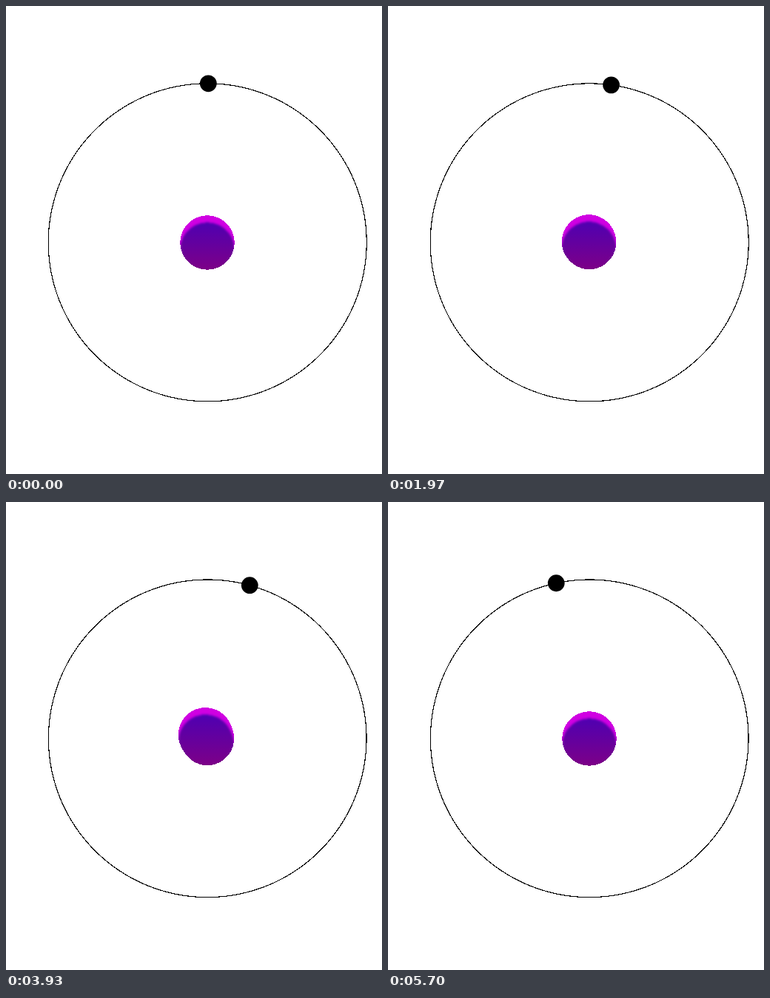
An HTML page with a canvas that plays this animation: 508x633 px, repeating every 5.73 s.

```html
<!DOCTYPE html>
<html lang="en">
<head>
<meta charset="utf-8">
<title>Pulsing molecule</title>
<style>
  html, body { margin: 0; width: 508px; height: 633px; overflow: hidden; background: #fff; }
  canvas { display: block; }
</style>
</head>
<body>
<canvas id="stage" width="508" height="633"></canvas>
<script>
const W = 508, H = 633, CX = 272, CY = 320, LOOP = 5730, CYCLE = 48;
const ctx = document.getElementById('stage').getContext('2d');

function layer() {
  const canvas = document.createElement('canvas');
  canvas.width = W;
  canvas.height = H;
  return canvas.getContext('2d', { willReadFrequently: true });
}
const mask = layer(), rim = layer(), face = layer();

// Atoms as [x, y, radius] when spread out; each wave sets off after the one before
const waves = [
  [[-134, -276, 37], [-239, -126, 30]],
  [[-135, -84, 28.5], [133, 89, 22.5]],
  [[-168, 24, 25.5], [-78, 81, 26.5], [97, 191, 28]],
  [[0, -79, 25.5], [-8, 33, 29.5]],
  [[190, 272, 36.5]],
  [[-76, -150, 31]]
];
const atoms = waves.flatMap((wave, i) => wave.map(([x, y, r]) => ({ x, y, r, wave: i })));

// Each chain of letters bonds neighbours; a is the first atom
const chains = ['akhidgj', 'kcefi', 'bc'];

const clamp = v => Math.max(0, Math.min(1, v));

// Bezier easing with flat ends; a and b are the handle times
function ease(x, a, b) {
  if (x <= 0 || x >= 1) return clamp(x);
  let lo = 0, hi = 1;
  for (let i = 0; i < 30; i++) {
    const s = (lo + hi) / 2, q = 1 - s;
    if (3 * a * s * q * q + 3 * b * s * s * q + s ** 3 < x) lo = s; else hi = s;
  }
  return lo * lo * (3 - 2 * lo);
}

function spread(phase, wave) {
  const turn = 12 + 1.06 * wave;
  return phase < turn
    ? ease((phase - 0.93 * wave) / 12, 0.79, 0.08)
    : 1 - ease((phase - turn) / 30, 0.97, 0.165);
}

function disc(c, x, y, r) {
  c.beginPath();
  c.arc(x, y, r, 0, 2 * Math.PI);
  c.fill();
}

// Hard-edged circle outline, so thin lines break up
function ring(cx, cy, r, width) {
  const outer = r + width / 2, inner = r - width / 2;
  const half = (radius, dy) => Math.sqrt(Math.max(0, radius * radius - dy * dy));
  const span = (y, a, b) => ctx.fillRect(Math.round(a), y, Math.round(b) - Math.round(a), 1);
  for (let y = Math.floor(cy - outer); y <= cy + outer; y++) {
    const dy = y + 0.5 - cy, o = half(outer, dy), i = half(inner, dy);
    span(y, cx - o, cx - i);
    span(y, cx + i, cx + o);
  }
}

function drawOrbit(phase) {
  const u = 1 - Math.abs(phase / 24 - 1);
  const curve = v => (2 * v) ** 3.25 / 2;
  const r = 215 - 133 * (u < 0.5 ? curve(u) : 1 - curve(1 - u));
  const cx = CX + 0.2, cy = CY - 0.2;
  const angle = (0.3 + 7.557 * phase) * Math.PI / 180;
  ctx.fillStyle = '#000';
  ring(cx, cy, r, r * 0.0055);
  disc(ctx, cx + r * Math.sin(angle), cy - r * Math.cos(angle), r * 0.053);
}

// Tapered bar, thicker towards the larger atom
function drawBond(a, b) {
  const len = Math.hypot(b.x - a.x, b.y - a.y);
  if (len < 1) return;
  const nx = (a.y - b.y) / len, ny = (b.x - a.x) / len;
  const corner = ({ x, y, r }, side) => {
    const w = side * 7 * (r / 36) ** 3;
    ctx.lineTo(x + nx * w, y + ny * w);
  };
  ctx.beginPath();
  corner(a, 1);
  corner(b, 1);
  corner(b, -1);
  corner(a, -1);
  ctx.fill();
}

// Blur and threshold, so that close atoms melt together
function meltMask(balls) {
  mask.clearRect(0, 0, W, H);
  mask.filter = 'blur(5px)';
  const path = new Path2D();
  for (const { x, y, r } of balls) {
    path.moveTo(x + r, y);
    path.arc(x, y, r, 0, 2 * Math.PI);
  }
  mask.fill(path);
  const image = mask.getImageData(0, 0, W, H), px = image.data;
  for (let i = 3; i < px.length; i += 4) px[i] = px[i] > 127 ? 255 : 0;
  mask.putImageData(image, 0, 0);
}

function tint(c, dy, filter, fill) {
  c.clearRect(0, 0, W, H);
  c.filter = filter;
  c.drawImage(mask.canvas, 0, dy);
  c.filter = 'none';
  c.globalCompositeOperation = 'source-in';
  c.fillStyle = fill;
  c.fillRect(0, 0, W, H);
  c.globalCompositeOperation = 'source-over';
}

function drawMolecule(phase) {
  const balls = atoms.map(({ x, y, r, wave }) => {
    const k = spread(phase, wave);
    return { x: CX + x * k, y: CY + y * k, r };
  });
  for (const chain of chains) {
    const links = [...chain].map(letter => balls[letter.charCodeAt(0) - 97]);
    links.slice(1).forEach((ball, i) => drawBond(links[i], ball));
  }

  const top = Math.min(...balls.map(b => b.y - b.r));
  const bottom = Math.max(...balls.map(b => b.y + b.r));
  const shade = ctx.createLinearGradient(0, top, 0, bottom);
  shade.addColorStop(0, '#4800b8');
  shade.addColorStop(1, '#7d0087');

  // bright silhouette with the soft-edged face slid down inside it
  meltMask(balls);
  tint(rim, 0, 'none', '#d000e2');
  tint(face, 9.5, 'blur(1.5px)', shade);
  rim.globalCompositeOperation = 'source-atop';
  rim.drawImage(face.canvas, 0, 0);
  rim.globalCompositeOperation = 'source-over';
  ctx.drawImage(rim.canvas, 0, 0);
}

let shown = -1;
function tick(now) {
  // 25 steps a second shown on a 30 per second grid
  const step = Math.floor(Math.floor((now % LOOP + 3.5) * 0.03) * 5 / 6);
  if (step !== shown) {
    shown = step;
    ctx.fillStyle = '#fff';
    ctx.fillRect(0, 0, W, H);
    drawOrbit(step % CYCLE);
    drawMolecule(step % CYCLE);
  }
  requestAnimationFrame(() => tick(performance.now() - start));
}
const start = performance.now();
tick(0);
</script>
</body>
</html>
```
